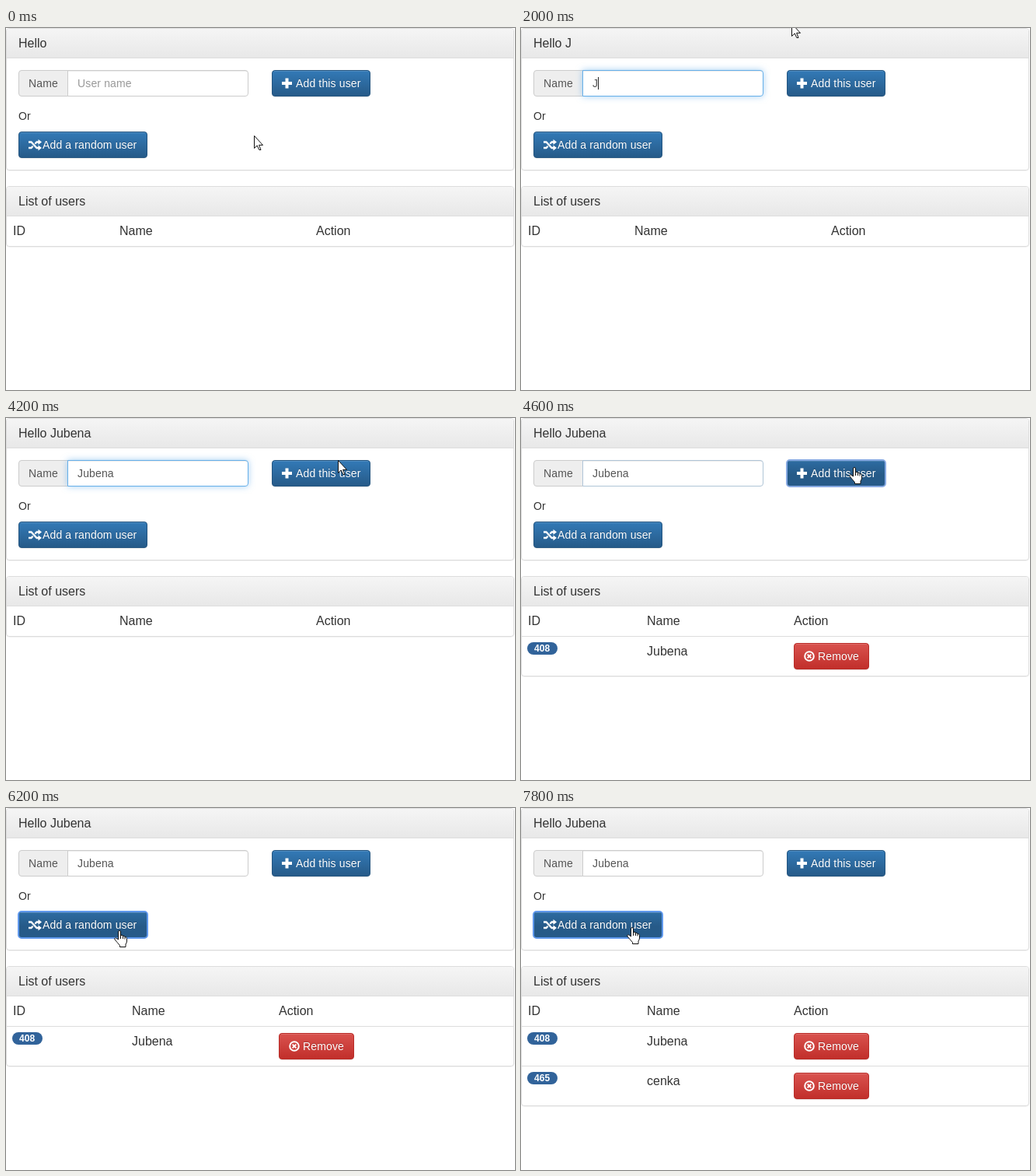
An HTML page for the animation above (8 s loop, 655 px wide and 465 px high).

```html
<!DOCTYPE html>
<html lang="en">
<head>
<meta charset="utf-8">
<title>User list</title>
<style>
  html, body { margin: 0; width: 100%; height: 100%; overflow: hidden; background: #fff; }
  svg { display: block; }
  text { font: 14px "Liberation Sans", Arial, sans-serif; fill: #333; letter-spacing: var(--gap, 0); }
  .big { font-size: 16px; letter-spacing: 0; }
  .gray { fill: #555; }
  .hint { fill: #999; }
  .btn { fill: #fff; }
  .shade { fill: #000; fill-opacity: .2; }
  .badge { font-size: 12px; font-weight: bold; fill: #fff; }
</style>
</head>
<body>
<svg width="655" height="465" viewBox="0 0 655 465">
  <defs>
    <linearGradient id="head" x2="0" y2="1">
      <stop stop-color="#f5f5f5"/><stop offset="1" stop-color="#e8e8e8"/>
    </linearGradient>
    <linearGradient id="blue" x2="0" y2="1">
      <stop stop-color="#337ab7"/><stop offset="1" stop-color="#265a88"/>
    </linearGradient>
    <linearGradient id="dark" x2="0" y2="1">
      <stop stop-color="#2d6ca2"/><stop offset=".56" stop-color="#265a88"/>
    </linearGradient>
    <linearGradient id="red" x2="0" y2="1">
      <stop stop-color="#d9534f"/><stop offset="1" stop-color="#c12e2a"/>
    </linearGradient>
    <filter id="glow" filterUnits="userSpaceOnUse" x="60" y="35" width="275" height="75">
      <feDropShadow dx="0" dy="0" stdDeviation="4" flood-color="#66afe9" flood-opacity=".6"/>
    </filter>
  </defs>
  <g id="page"></g>
</svg>
<script>
const LOOP = 8000;
const NAME = 'Jubena';
const USERS = [
  { id: 408, name: NAME, from: 4600 },
  { id: 465, name: 'cenka', from: 6600 },
];

// [start, value...]: each entry holds until the next one
const TYPED = [[0, 0], [2000, 1], [2400, 2], [3000, 3], [3200, 5], [3400, 6]];
const CARET = [[0, 0], [800, 1], [1400, 0], [2000, 1], [2800, 0], [3000, 1], [4000, 0], [4400, 1], [4600, 0]];
const POINTER = [
  [0, 'arrow', 319, 138], [200, 'beam', 239, 50], [400, 'beam', 248, 59], [800, 'beam', 266, 50],
  [1000, 'arrow', 348, -6], [4000, 'arrow', 425, 38], [4200, 'arrow', 427, 54],
  [4400, 'hand', 422, 63], [4800, 'hand', 421, 65], [5200, 'hand', 395, 68],
  [5400, 'arrow', 217, 132], [5600, 'hand', 139, 157], [6600, 'hand', 138, 157],
  [7400, 'hand', 138, 154], [7600, 'hand', 137, 153], [7800, 'hand', 136, 153],
];

const CURSORS = {
  arrow: '<path d="M.5 .5V16.5L4.2 13L6.8 18.5H9L6.6 12.4H11.5Z" fill="#fff" stroke="#111"/>',
  beam: '<path d="M0 .5H3M4 .5H7M3.5 1V16M0 16.5H3M4 16.5H7" fill="none" stroke="#333"/>',
  hand: '<path d="M5.5 12V2Q5.5 .5 7 .5T8.5 2V7.5Q8.5 6.3 10 6.3T11.5 8Q11.6 7.3 12.8 7.4T14 9Q14.3 8.5 15.3 8.8T16.5 10.5V14Q16.5 16 15 18V21.5H7.5V19.5L4 15.5L1 12Q.3 10.5 1.5 10T4 10.8Z" fill="#fff" stroke="#111"/>'
    + '<path d="M8.5 7V11M11.5 8V11M14 9V11.5" stroke="#111"/>',
};

const ICONS = {
  plus: '<path d="M0 6H13M6.5 -.5V12.5" stroke="#fff" stroke-width="4"/>',
  shuffle: '<path d="M0 2.5H3.5L10.5 10H13M0 10H3.5L5.6 7.8M8.4 4.7L10.5 2.5H13" fill="none" stroke="#fff" stroke-width="2.3"/>'
    + '<path d="M12.5 -1L17 2.5L12.5 6ZM12.5 6.5L17 10L12.5 13.5Z" fill="#fff"/>',
  remove: '<circle cx="7" cy="6" r="5.8" fill="none" stroke="#fff" stroke-width="2"/>'
    + '<path d="M4.6 3.6L9.4 8.4M9.4 3.6L4.6 8.4" stroke="#fff" stroke-width="2"/>',
};

const page = document.getElementById('page');

const at = (track, t) => track.filter(k => k[0] <= t).pop().slice(1);
const within = (t, a, b) => t >= a && t < b;
const text = (x, y, s, cls = '') => `<text x="${x}" y="${y}" class="${cls}">${s}</text>`;
const place = (x, y, s) => `<g transform="translate(${x} ${y})">${s}</g>`;
const line = (x1, x2, y, color) => `<path d="M${x1} ${y}H${x2}" stroke="${color}"/>`;

// Bordered box covering whole pixels
const box = (x, y, w, h, r, fill, stroke, extra = '') =>
  `<rect x="${x + .5}" y="${y + .5}" width="${w - 1}" height="${h - 1}" rx="${r}" fill="${fill}" stroke="${stroke}" ${extra}/>`;

function panel(y, h, title) {
  return box(0, y + 1, 654, h, 4, 'none', '#000', 'stroke-opacity=".05"')
    + box(0, y, 654, h, 3.5, '#fff', '#ddd')
    + `<path d="M1 ${y + 38}V${y + 4}Q1 ${y + 1} 4 ${y + 1}H650Q653 ${y + 1} 653 ${y + 4}V${y + 38}Z" fill="url(#head)"/>`
    + line(1, 653, y + 38.5, '#ddd')
    + text(16, y + 25, title, 'big');
}

function button(x, y, w, icon, textX, label, fill, border, ring) {
  const outline = ring
    ? `<rect x="${x}" y="${y}" width="${w}" height="34" rx="4" fill="none" stroke="${ring}" stroke-width="2"/>` : '';
  return box(x, y + 1, w, 34, 4, 'none', '#000', 'stroke-opacity=".075"')
    + box(x, y, w, 34, 3.5, `url(#${fill})`, border)
    + line(x + 3, x + w - 3, y + 1.5, 'rgba(255,255,255,.15)')
    + outline
    + place(x + 13, y + 11, ICONS[icon])
    + text(textX, y + 21, label, 'shade') + text(textX, y + 22, label, 'btn');
}

function blueButton(x, y, w, icon, textX, label, hover, focus, ring) {
  const border = hover ? '#204d74' : focus ? '#122b40' : '#245580';
  return button(x, y, w, icon, textX, label, hover || focus ? 'dark' : 'blue', border, focus && ring);
}

function field(t, typed) {
  const focus = within(t, 800, 4600);
  const border = focus ? '#66afe9' : within(t, 4600, 4800) ? '#b0c5d7' : '#ccc';
  const shape = 'M79.5 54.5H308Q311.5 54.5 311.5 58V84Q311.5 87.5 308 87.5H79.5Z';
  const caretX = 92 + (typed ? 8 * typed - 1 : 0);
  return box(16, 54, 70, 34, 3.5, '#eee', '#ccc')
    + text(29, 76, 'Name', 'gray')
    + `<path d="${shape}" fill="#fff" stroke="${border}" ${focus ? 'filter="url(#glow)"' : ''}/>`
    + line(80, 310, 55.5, 'rgba(0,0,0,.075)')
    + (typed ? text(92, 76, NAME.slice(0, typed), 'gray') : text(92, 76, 'User name', 'hint'))
    + (at(CARET, t)[0] ? `<rect x="${caretX}" y="63" width="1" height="16" fill="#222"/>` : '');
}

function userRow(user, i) {
  const y = 280 + 51 * i;
  return line(1, 653, y + .5, '#ddd')
    + `<rect x="8" y="${y + 8}" width="39" height="16" rx="8" fill="#31639a"/>`
    + text(17, y + 20, user.id, 'badge')
    + text(162, y + 25, user.name, 'big')
    + button(351, y + 9, 97, 'remove', 382, 'Remove', 'red', '#b92c28');
}

function scene(t) {
  const [typed] = at(TYPED, t);
  const [kind, x, y] = at(POINTER, t);
  const rows = USERS.filter(u => t >= u.from);
  const [nameX, actionX] = rows.length ? [162, 351] : [146, 399];
  return panel(0, 183, `Hello ${NAME.slice(0, typed)}`)
    + field(t, typed)
    + blueButton(342, 54, 127, 'plus', 373, 'Add this user',
        within(t, 4400, 5400), within(t, 4600, 6200), '#86a9e2')
    + text(16, 118, 'Or')
    + blueButton(16, 133, 166, 'shuffle', 47, 'Add a random user', t >= 5600, t >= 6200, '#5f98ec')
    + panel(203, 78 + 51 * rows.length, 'List of users')
    + text(9, 266, 'ID', 'big') + text(nameX, 266, 'Name', 'big') + text(actionX, 266, 'Action', 'big')
    + rows.map(userRow).join('')
    + place(x, y, CURSORS[kind]);
}

// Small type sits on a whole-pixel grid; add the part the renderer leaves out
page.innerHTML = text(0, 0, 'nnnnnnnn');
const advance = page.firstChild.getComputedTextLength() / 8;
document.body.style.setProperty('--gap', `${Math.max(0, 8 - advance) * .65}px`);

let shown = '';
const start = performance.now();
function tick() {
  const next = scene((performance.now() - start) % LOOP);
  if (next !== shown) page.innerHTML = shown = next;
  requestAnimationFrame(tick);
}
tick();
</script>
</body>
</html>
```
